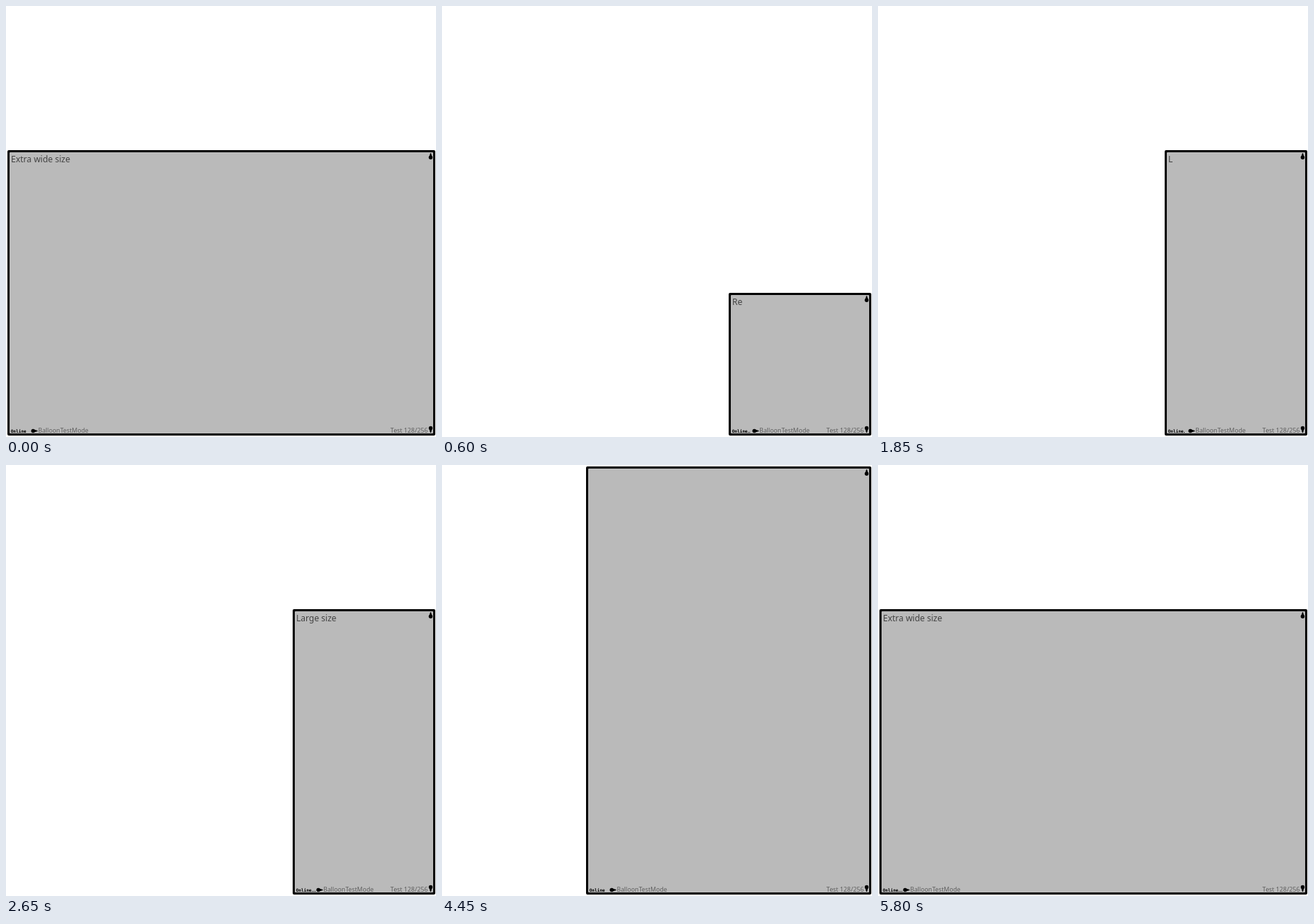
Recreate the animation shown at these times as an HTML page with a canvas. Size 603 by 604 pixels, loop 5850 ms.

```html
<!DOCTYPE html>
<html lang="en">
<head>
<meta charset="utf-8">
<title>Balloon sizes</title>
<style>
html, body { margin: 0; width: 100%; height: 100%; overflow: hidden; background: #fff; }
canvas { display: block; }
</style>
</head>
<body>
<canvas id="stage" width="603" height="604"></canvas>
<script>
const ctx = document.getElementById('stage').getContext('2d');
const LOOP = 5850, TICK = 50, RATE = 1.25;
const RIGHT = 602, BOTTOM = 602;

// Each scene types its title; `lead` is the count typed on its first tick.
const scenes = [
  { start: 550, lead: 0.75, title: 'Regular size', x: 402, y: 402 },
  { start: 1850, lead: 1.75, title: 'Large size', x: 402, y: 202 },
  { start: 3050, lead: 1.75, title: 'Extra large size', x: 202, y: 2 },
  { start: 4450, lead: 0.75, title: 'Extra wide size', x: 2, y: 202 }
];

// [time, number of dots after "Online"]
const dotSteps = [
  [0, 0], [250, 1], [550, 2], [850, 3], [1450, 0], [1850, 1], [2150, 2], [2650, 3],
  [3050, 1], [3350, 2], [4250, 3], [4450, 0], [4750, 1], [5050, 2], [5800, 3]
];

function label(text, x, y, font, color, align = 'left') {
  ctx.font = font;
  ctx.fillStyle = color;
  ctx.textAlign = align;
  ctx.fillText(text, x, y);
}

// A round knob with a pointed tip, turned by quarter turns from "up".
function pointer(x, y, turns, length) {
  ctx.save();
  ctx.translate(x, y);
  ctx.rotate(turns * Math.PI / 2);
  ctx.fillStyle = '#000';
  ctx.beginPath();
  ctx.arc(0, 0, 2.7, 0, Math.PI * 2);
  ctx.fill();
  ctx.beginPath();
  ctx.moveTo(-2, -1);
  ctx.lineTo(-0.5, -length);
  ctx.lineTo(0.5, -length);
  ctx.lineTo(2, -1);
  ctx.fill();
  ctx.restore();
}

function balloon(x, y, title, dots) {
  ctx.fillStyle = '#000';
  ctx.beginPath();
  ctx.roundRect(x, y, RIGHT - x, BOTTOM - y, 2);
  ctx.fill();
  ctx.fillStyle = '#bababa';
  ctx.beginPath();
  ctx.roundRect(x + 3, y + 3, RIGHT - x - 6, BOTTOM - y - 6, 1);
  ctx.fill();

  label(title, x + 5, y + 17, '12px "Noto Sans", sans-serif', '#444');
  label('BalloonTestMode', x + 43, 598, '8.7px "Noto Sans", sans-serif', '#606060');
  label('Test 128/256', 591.5, 598, '8.8px "Noto Sans", sans-serif', '#606060', 'right');
  label('Online', x + 4.7, 598, 'bold 6px "DejaVu Sans Mono", monospace', '#000');
  for (let i = 0; i < dots; i++) ctx.fillRect(x + 27 + 2 * i, 597, 1, 1);

  pointer(595.5, y + 10.3, 0, 6);
  pointer(595.5, 591.5, 2, 6.5);
  pointer(x + 36, 595.5, 1, 6.2);
}

function draw(ms) {
  const t = ms % LOOP;
  let index = scenes.length - 1, typed = Infinity;
  scenes.forEach((scene, i) => {
    if (t < scene.start) return;
    index = i;
    typed = Math.floor(scene.lead + RATE * Math.floor((t - scene.start) / TICK));
  });
  const scene = scenes[index];
  // The title clears one tick before the balloon takes its new size.
  const shape = typed ? scene : scenes[(index + 3) % 4];
  const dots = dotSteps.filter(([time]) => time <= t).pop()[1];

  ctx.fillStyle = '#fff';
  ctx.fillRect(0, 0, 603, 604);
  balloon(shape.x, shape.y, scene.title.slice(0, typed), dots);
}

const began = performance.now();
function frame() {
  draw(Math.max(0, performance.now() - began));
  requestAnimationFrame(frame);
}
frame();
</script>
</body>
</html>
```
